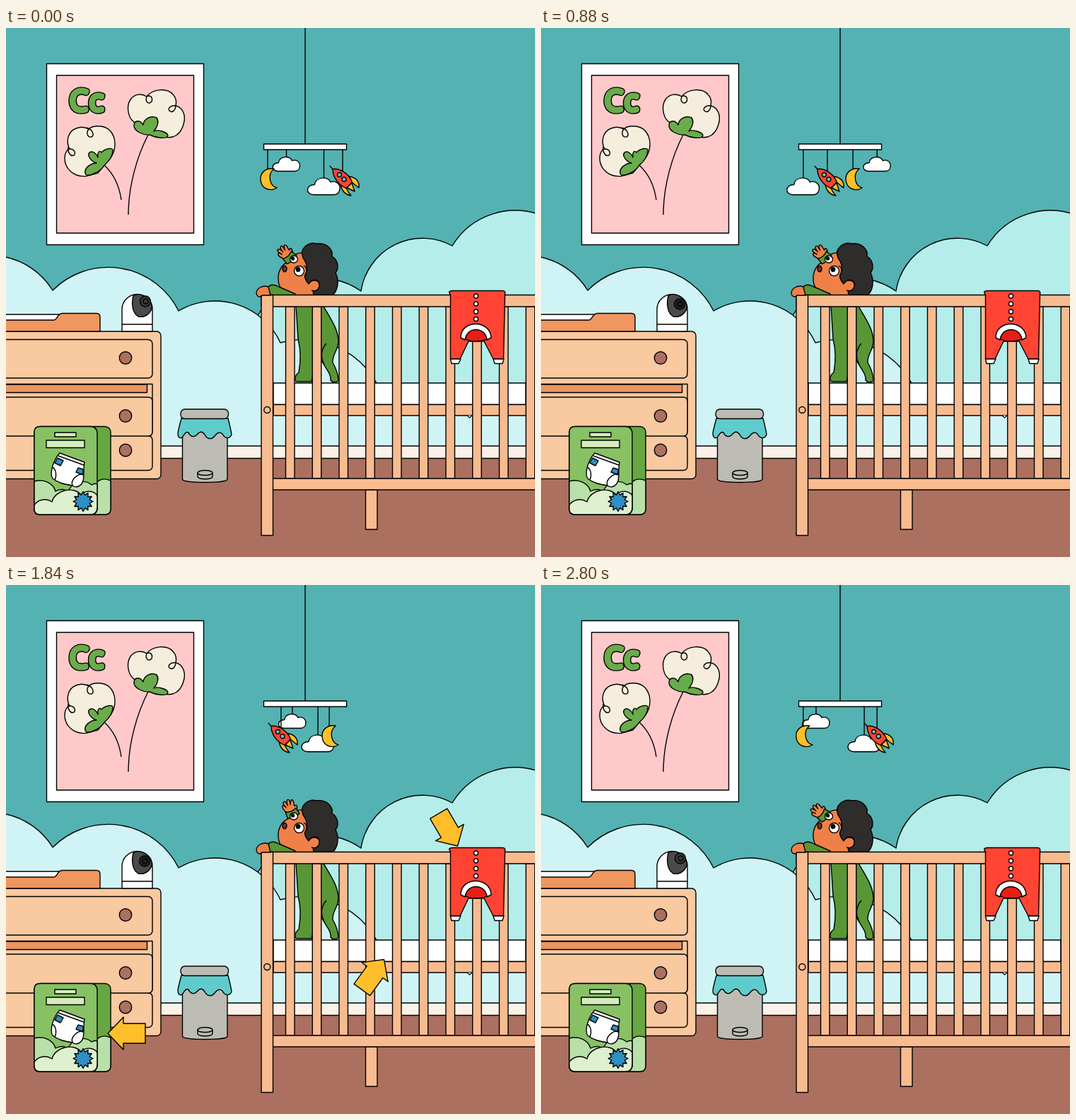
Write an HTML page that moves like this. It is 748 px wide and 748 px high and loops after 2.88 s.

```html
<!DOCTYPE html>
<html lang="en">
<head>
<meta charset="utf-8">
<title>Nursery</title>
<style>
html, body { margin: 0; width: 100%; height: 100%; overflow: hidden; background: #54b2b2; }
svg { display: block; width: 100vw; height: 100vh; stroke: #000; stroke-width: 1.4; stroke-linejoin: round; }
path { vector-effect: non-scaling-stroke; }
.line { fill: none; }
.white { fill: #fff; }
.wood { fill: #f8bb90; }
.chest { fill: #f9c9a0; }
.clay { fill: #ac7060; }
.cream { fill: #f6eedd; }
.leaf { fill: #69ac4b; }
.suit { fill: #599636; }
.skin { fill: #ef8148; }
.gold { fill: #ffbf2b; }
.red { fill: #ff4433; }
.hair { fill: #2e2d2c; }
.grey { fill: #bcbcb5; }
.mint { fill: #b8e0a8; }
.pale { fill: #dff0cf; }
.blue { fill: #2e8fc5; }
.letters { font: 300 40px "Open Sans", sans-serif; letter-spacing: 3px; }
</style>
</head>
<body>
<svg viewBox="0 0 748 748">
  <defs>
    <path id="cloud" class="white" d="M-12 20C-22 20-22 8-11 8C-10-2 6-2 8 5C13 3 19 6 19 12C19 17 16 20 12 20Z"/>
    <path id="arrow" class="gold" d="M0 0L-22-23V-14H-53V14H-22V23Z"/>
  </defs>

  <!-- wall and floor -->
  <path fill="#b4ede9" d="M357 600V405A100 100 0 0 1 502 372A88 88 0 0 1 631 308A104 104 0 0 1 760 266V600Z"/>
  <path fill="#d0f4f5" d="M-5 600V323A104 104 0 0 1 66 371A111 111 0 0 1 244 400A102 102 0 0 1 388 445A120 120 0 0 1 524 502L530 510H760V600Z"/>
  <rect x="-5" y="591" width="760" height="18" fill="#fbf1e8"/>
  <rect x="-5" y="608.500" width="760" height="150" class="clay"/>

  <!-- poster -->
  <path class="white" d="M57.500 50.500H279.500V306.500H57.500Z"/>
  <path fill="#ffc9ca" d="M71.500 67H265.500V290H71.500Z"/>
  <g class="letters">
    <text x="90.400" y="116.500" stroke-width="9.600">Cc</text>
    <text x="90.400" y="116.500" fill="#69ac4b" stroke="#69ac4b" stroke-width="6.800">Cc</text>
  </g>
  <path class="line" d="M139 194C152 206 160 222 163 243M201 151C186 180 173 222 173 264"/>
  <path class="cream" d="M113 209.500C96 211 83 199 83 184C83 177 86 172 90 171C84 160 88 146 99 142C106 139 112 140 117 143C123 137 139 137 147 145C157 156 155 172 149 182L130 205Z"/>
  <path class="line" d="M117 143C113 148 115 155 121 154C125 152 123 143 114 141M90 171C97 171 99 177 96 180C91 182 87 176 88 168"/>
  <path class="leaf" d="M139 194C133 204 115 212 112 206C110 197 121 191 128 191C121 189 114 181 118 176C123 173 128 178 130 183C129 176 132 172 135 176C139 171 151 168 151 173C151 182 145 189 139 194Z"/>
  <path class="cream" d="M185 135C173 131 169 112 176 101C182 93 192 92 199 97C207 86 228 84 236 94C241 99 241 106 240 110C250 112 255 124 251 136C247 151 236 157 225 154L206 150Z"/>
  <path class="line" d="M199 97C196 104 202 109 206 104C208 98 204 94 198 97M240 110C234 109 228 113 231 117C235 121 240 116 240 109"/>
  <path class="leaf" d="M203 151C195 152 180 146 181 137C182 130 190 130 194 137C195 128 205 123 213 127C217 133 213 141 209 146C214 143 228 147 229 152C228 158 211 155 203 151Z"/>

  <!-- mobile -->
  <path class="line" d="M423 0V164"/>
  <g id="mobile">
    <g id="small"><path d="M0 172V183"/><use href="#cloud" y="182.500"/></g>
    <g id="large"><path d="M0 172V212"/><use href="#cloud" transform="translate(0 212) scale(1.19)"/></g>
    <g id="moon">
      <path d="M0 172V202"/>
      <path class="gold" d="M9 199C-4 197-11 206-10 215C-9 227 3 232 13 226C4 224-2 208 9 199Z"/>
    </g>
    <g id="rocket">
      <path d="M0 172V203M-18 195L-13 201"/>
      <path class="gold" d="M9 210C19 211 24 217 23 226L13 218ZM-3 221C-1 232 5 236 12 237C8 233 7 230 5 226ZM6 226L13 219L17 231Z"/>
      <path class="red" d="M-14 199.500C-4 198 9 206 13.500 218L5 226.500C-6 222-14 211-14 199.500Z"/>
      <circle cx="-4.500" cy="207.500" r="3" fill="#5fc3cb"/>
      <circle cx="2" cy="214" r="3" fill="#5fc3cb"/>
    </g>
  </g>
  <rect x="364.500" y="164" width="117" height="8" class="white"/>

  <!-- dresser -->
  <rect x="-10" y="429" width="229" height="208.500" rx="6" class="chest"/>
  <rect x="-10" y="440.500" width="217" height="54.500" rx="6" class="chest"/>
  <path class="chest" d="M-5 503.500H207V570Q207 577 201 577H-5Z"/>
  <path fill="#ec9560" d="M-5 504H199.500V515.500H-5Z"/>
  <path class="chest" d="M-5 522H201Q207 522 207 528V571Q207 577 201 577H-5ZM-5 577H201Q207 577 207 583V619Q207 625.500 201 625.500H-5Z"/>
  <circle cx="169" cy="466.500" r="8.700" class="clay"/>
  <circle cx="169" cy="548.500" r="8.700" class="clay"/>
  <circle cx="169" cy="597" r="8.700" class="clay"/>
  <path class="white" d="M-5 405H76V414H-5Z"/>
  <path fill="#f0965f" d="M-5 413H67C73 413 72 403.500 80 403.500H128Q133 403.500 133 409V429H-5Z"/>

  <!-- baby monitor -->
  <path class="white" d="M164 429V398A21.500 21.500 0 0 1 207 398V429ZM164 419H207"/>
  <path fill="#4a4a4a" d="M180 378.500C177 391 179 403 187 408C198 410 206 402 206.500 393C204 381 190 373 180 378.500Z"/>
  <g id="lens" fill="#222"><circle cx="196" cy="390.500" r="7.500"/><circle cx="196.500" cy="390.500" r="3.500"/></g>

  <!-- nappy pack -->
  <rect x="40" y="563.500" width="108" height="124.500" rx="8" fill="#67a742"/>
  <path class="mint" d="M126 646C132 636 141 637 148 640V680Q148 688 140 688H118Z"/>
  <path fill="#87c164" d="M48 563.500H119Q129 563.500 129 574V678Q129 688 119 688H48Q40 688 40 680V571Q40 563.500 48 563.500Z"/>
  <path class="mint" d="M40 641C54 637 67 644 70 655C77 651 84 652 88 656C92 642 111 637 121 646Q126 643 129 645V678Q129 688 119 688H48Q40 688 40 680Z"/>
  <path class="pale" d="M40 675C44 667 56 664 65 670C70 652 97 648 106 660C114 652 125 655 129 661V678Q129 688 119 688H48Q40 688 40 680Z"/>
  <path fill="#d5edbe" d="M69 572H99V578H69ZM57 583H111V593.500H57Z"/>
  <path class="white" d="M76 601L111 614C109 624 111 632 109 640C107 648 99 651 94 647C82 645 73 643 66 637C61 629 67 611 76 601Z"/>
  <path class="blue" d="M73 608L81 612L77 619L69 615ZM102 622L109 624V632L99 628Z"/>
  <path class="line" d="M74 605L110 618M65 621C71 623 72 633 69 639M110 630C99 631 91 640 94 647"/>
  <path id="badge" class="blue"/>

  <!-- bin -->
  <path class="grey" d="M249.500 565H313V638C313 644 249.500 644 249.500 638Z"/>
  <path fill="#5fcbcd" d="M248 552H314C316 560 318 568 319 575C316 582 309 580 306 574C302 570 298 573 295 577C290 583 284 581 281 575C277 569 273 571 270 575C265 580 260 577 258 572C254 570 252 575 249 579C245 581 243 578 243 573C244 566 246 560 248 552Z"/>
  <rect x="247" y="539" width="67.500" height="13.500" rx="6" class="grey"/>
  <path class="grey" d="M271 629V634C271 639 292 639 292 634V629"/>
  <ellipse cx="281.500" cy="629" rx="10.500" ry="3.500" class="grey"/>

  <!-- baby -->
  <path class="suit" d="M409 377H440C452 402 470 422 470 443C470 455 461 462 462 473C467 482 470 490 470 499C466 502 461 501 459 498C460 490 454 484 446 470L437 457L434 462C436 475 436 487 432 500H412C406 500 409 490 414 487C417 470 417 455 413 440Z"/>
  <path class="line" d="M453 446C445 455 445 466 450 476"/>
  <path class="skin" d="M422 318C411 317 403 322 400 330C392 333 386 341 385 351C384 364 390 374 400 378H442V330Z"/>
  <g id="wave">
    <path class="skin" d="M-6-14C-9-19-11-24-9-26C-7-27-6-25-5-22C-8-28-7-31-5-31C-3-31-2-27-2-24C-2-29-1-32 1-32C3-32 3-28 2-24C4-30 6-31 7-29C9-27 6-23 7-20C9-22 11-21 10-18C9-15 7-14 6-12Z"/>
    <path class="suit" d="M-8-16Q0-13 8-17L10-8Q1-4-8-7Z"/>
  </g>
  <path class="hair" d="M420 325C414 311 429 302 439 305C453 303 463 313 461 323C470 328 471 340 466 346C472 358 469 371 462 378H435L434 370C442 371 446 361 440 357C434 354 430 360 428 362C423 357 421 350 424 347C428 337 423 329 420 325Z"/>
  <path class="skin" d="M428 362C432 354 444 356 443 365C442 371 437 373 432 371"/>
  <g class="white">
    <ellipse cx="407" cy="327" rx="5.500" ry="5"/>
    <circle cx="414.500" cy="343.500" r="7"/>
  </g>
  <circle cx="405.500" cy="326" r="2"/>
  <circle cx="413" cy="341.500" r="2.700"/>
  <path class="line" d="M421 336Q426 339 425 345"/>
  <ellipse cx="394" cy="340.500" rx="3" ry="4.200" fill="#70302b"/>
  <path class="suit" d="M374 382L369 368C374 361 381 363 386 366L409 376V382Z"/>

  <!-- crib -->
  <path class="white" d="M378 502H735V532.500H378Z"/>
  <rect x="378" y="532.500" width="380" height="15.500" class="wood"/>
  <path class="white" d="M652 548L655.500 551L659 548"/>
  <g id="bars" class="wood"></g>
  <g class="wood">
    <path d="M508.500 653H525V709H508.500Z"/>
    <rect x="370" y="637" width="390" height="16"/>
    <rect x="361" y="377.500" width="400" height="16.500"/>
    <rect x="361" y="377.500" width="16.500" height="340"/>
    <circle cx="369.300" cy="540" r="4.500"/>
  </g>
  <path class="skin" d="M371 366C363 363 354 368 354 375C355 381 360 381 362 378H374Z"/>

  <!-- romper -->
  <path class="red" d="M631 371.500H702Q707 371.500 705.500 377L703.500 468H689L676 443H654L642 468H628.500V377Q624 372 631 371.500Z"/>
  <path class="white" d="M628.500 468H643L640 474.500H630ZM689 468H704L702 474.500H691ZM643 438C643 412 685 412 686 438L680 441C677 424 651 424 649 441Z"/>
  <path fill="#e81e14" d="M649.500 440C652 422 677 422 680 440C672 444 657 444 649.500 440Z"/>
  <g class="white">
    <circle cx="664.500" cy="379" r="3"/><circle cx="664.500" cy="390" r="3"/>
    <circle cx="664.500" cy="401" r="3"/><circle cx="664.500" cy="411.500" r="3"/>
  </g>

  <g id="arrows">
    <g transform="translate(144 634) rotate(180)"><use href="#arrow"/></g>
    <g transform="translate(638.500 369) rotate(59.600)"><use href="#arrow"/></g>
    <g transform="translate(534.500 529.500) rotate(-54)"><use href="#arrow"/></g>
  </g>
</svg>
<script>
const $ = id => document.getElementById(id);
const STEP = 80, STEPS = 36, TAU = Math.PI * 2;
const [mobile, small, large, moon, rocket, wave, lens, arrows] =
  ['mobile', 'small', 'large', 'moon', 'rocket', 'wave', 'lens', 'arrows'].map($);

$('bars').innerHTML = Array.from({ length: 10 }, (_, i) =>
  `<rect x="${395.5 + i * 37.75}" y="394" width="12.500" height="243"/>`).join('');

$('badge').setAttribute('d', 'M' + Array.from({ length: 24 }, (_, i) => {
  const r = i % 2 ? 9.5 : 14, a = i * TAU / 24;
  return (109 + r * Math.sin(a)).toFixed(1) + ' ' + (669.5 - r * Math.cos(a)).toFixed(1);
}).join('L') + 'Z');

const ease = u => (1 - Math.cos(Math.PI * u)) / 2;

// Eased value between [step, value] keys
function track(keys, n) {
  const i = keys.findIndex(k => k[0] > n);
  const [a, va] = keys[i - 1], [b, vb] = keys[i];
  return va + (vb - va) * ease((n - a) / (b - a));
}

const waveKeys = [[0, 0], [7, 1], [15, -1], [23, 1], [28, -1], [35, -.45], [36, 0]];
const lensKeys = [[0, -4], [4, 0], [31, 0], [35, -4], [36, -4]];

function hang(el, n, peak) {
  const x = 423 + 53 * Math.cos((n - peak) / STEPS * TAU);
  el.setAttribute('transform', `translate(${x.toFixed(2)} 0)`);
}

let layer;
function draw(n) {
  hang(small, n, 12);
  hang(large, n, 30);
  hang(moon, n, 18);
  hang(rocket, n, 0);
  const cloudsFront = n > 0 && n < 18;
  if (cloudsFront !== layer) {
    layer = cloudsFront;
    mobile.append(...(layer ? [rocket, moon, small, large] : [small, large, moon, rocket]));
  }

  wave.setAttribute('transform', `translate(408 334) rotate(${-39 + 20 * track(waveKeys, n)})`);
  const tilt = track(lensKeys, n);
  lens.setAttribute('transform', `translate(${-tilt / 4} ${tilt})`);
  lens.setAttribute('fill', tilt < -2 ? '#3a3a3a' : '#222');

  arrows.style.display = n >= 13 && n <= 25 ? '' : 'none';
  const push = 5 * (1 - Math.cos((n - 15) / 8 * TAU));
  for (const g of arrows.children) g.firstElementChild.setAttribute('x', push.toFixed(2));
}

const start = performance.now();
function tick() {
  draw(Math.floor((performance.now() - start) / STEP) % STEPS);
  requestAnimationFrame(tick);
}
tick();
</script>
</body>
</html>
```
